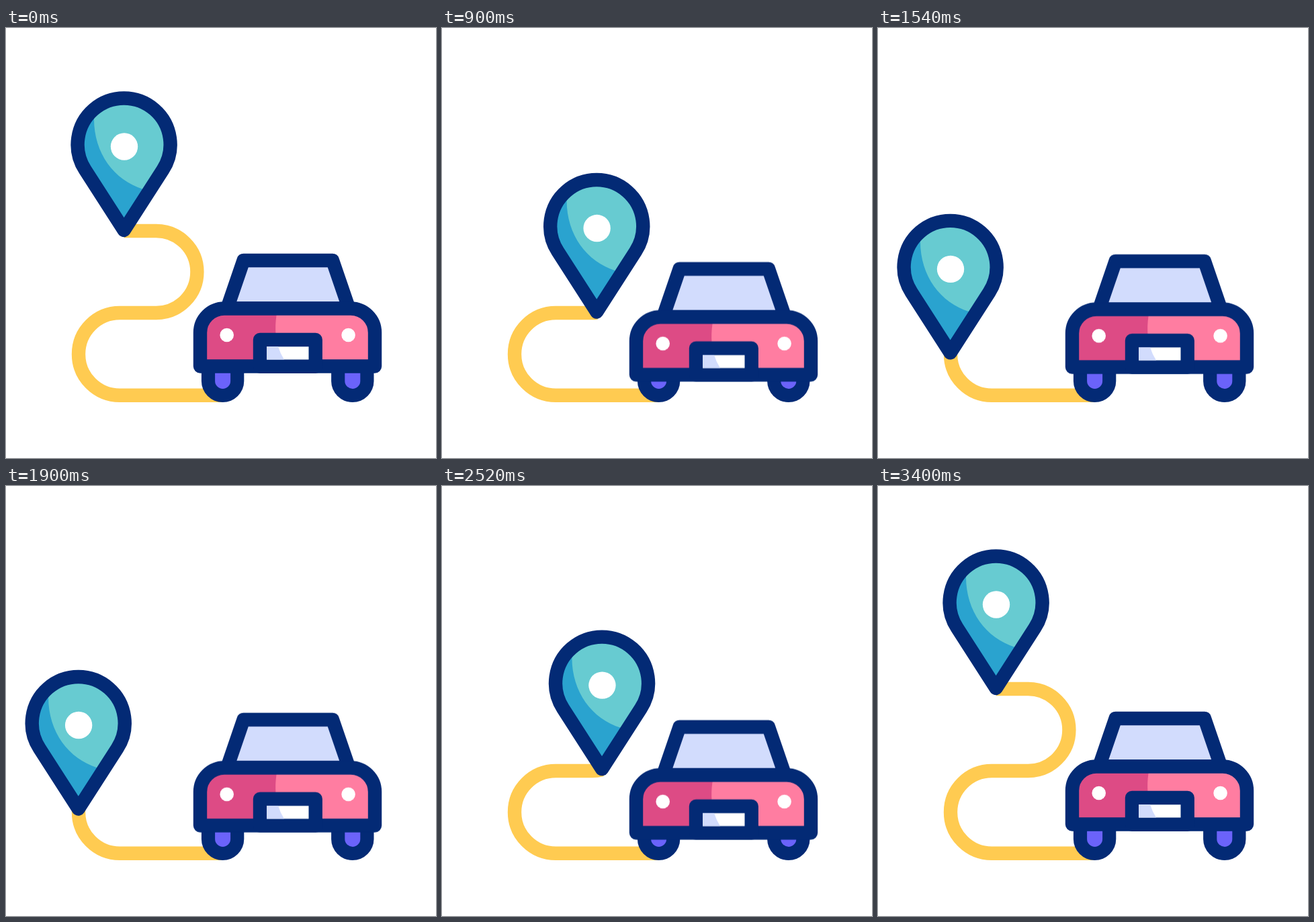
An HTML page for the animation above (3.42 s loop, 640 by 640 pixels).

```html
<!DOCTYPE html>
<html lang="en">
<head>
<meta charset="utf-8">
<title>Route to the car</title>
<style>
  html, body { margin: 0; width: 100%; height: 100%; overflow: hidden; background: #fff; }
  svg { display: block; width: 100vw; height: 100vh; }

  .line { stroke: #032a75; stroke-width: 20.4; stroke-linejoin: round; }
  .sky { fill: #d2dcfd; }
  .white { fill: #fff; }

  .road, .pin, .car { animation: 3420ms cubic-bezier(.333, 0, .667, 1) infinite; }
  .road, .pin { animation-name: travel; }
  .car { animation-name: bounce; }

  .road { fill: none; stroke: #ffcb51; stroke-width: 20.4; stroke-dasharray: 1000 1000; }
  .pin {
    offset-path: path("M176 302H223.4A61 61 0 0 1 223.4 424H169.4A61.4 61.4 0 0 0 169.4 546.8H322");
    offset-rotate: 0deg;
    offset-anchor: 0 0;
    transform-origin: 0 0;
  }

  /* The pin eats the road up to the leftmost point of the second bend. */
  @keyframes travel {
    0%, 99.415%, 100% { offset-distance: 0px; stroke-dashoffset: 0px; }
    46.784%, 52.632% { offset-distance: 389.5px; stroke-dashoffset: -389.5px; }
  }
  @keyframes bounce {
    0%, 49.708%, 99.415%, 100% { transform: translateY(0); }
    24.854%, 74.561% { transform: translateY(12.7px); }
  }
</style>
</head>
<body>
<svg viewBox="0 0 640 640">
  <defs>
    <g id="wheel">
      <path fill="#032a75" d="M-31.7 500H31.7V525.4A31.7 31.7 0 0 1 -31.7 525.4Z"/>
      <path fill="#6b63fa" d="M-11.5 500H11.5V525.4A11.5 11.5 0 0 1 -11.5 525.4Z"/>
    </g>
  </defs>

  <path class="road" d="M176 302H223.4A61 61 0 0 1 223.4 424H169.4A61.4 61.4 0 0 0 169.4 546.8H322"/>

  <use href="#wheel" x="322.6"/>
  <use href="#wheel" x="515.8"/>

  <g class="car">
    <path class="line sky" d="M329 417.5L353.5 346H486L510.500 417.5Z"/>
    <path fill="#ff7da1" d="M289 503.5V453.500A36 36 0 0 1 325 417.500H513A36 36 0 0 1 549 453.500V503.500Z"/>
    <path fill="#dd4b85" d="M289 503.500V453.500A36 36 0 0 1 325 417.500H402.500V428Q400.500 441 401.500 456V503.500Z"/>
    <path class="line" fill="none" d="M289 503.500V453.500A36 36 0 0 1 325 417.500H513A36 36 0 0 1 549 453.500V503.500Z"/>
    <path class="line white" d="M378 503.800V464H460.700V503.800Z"/>
    <path class="sky" d="M388 474H405Q408 484 414 493.500H388Z"/>
    <circle class="white" cx="328.700" cy="457" r="10.300"/>
    <circle class="white" cx="509.600" cy="457" r="10.300"/>
  </g>

  <g class="pin">
    <g transform="translate(-176 -302)">
      <path fill="#67cbd1" d="M175.600 301L117.700 211A69 69 0 1 1 233.500 211Z"/>
      <path fill="#2aa3cf" d="M175.600 301L117.700 211A69 69 0 0 1 125 126.500L131 133C130 185 160 226 204 240L212.800 243Z"/>
      <path class="line" fill="none" d="M175.600 301L117.700 211A69 69 0 1 1 233.500 211Z"/>
      <circle class="white" cx="176" cy="176.500" r="20.200"/>
    </g>
  </g>
</svg>
</body>
</html>
```
